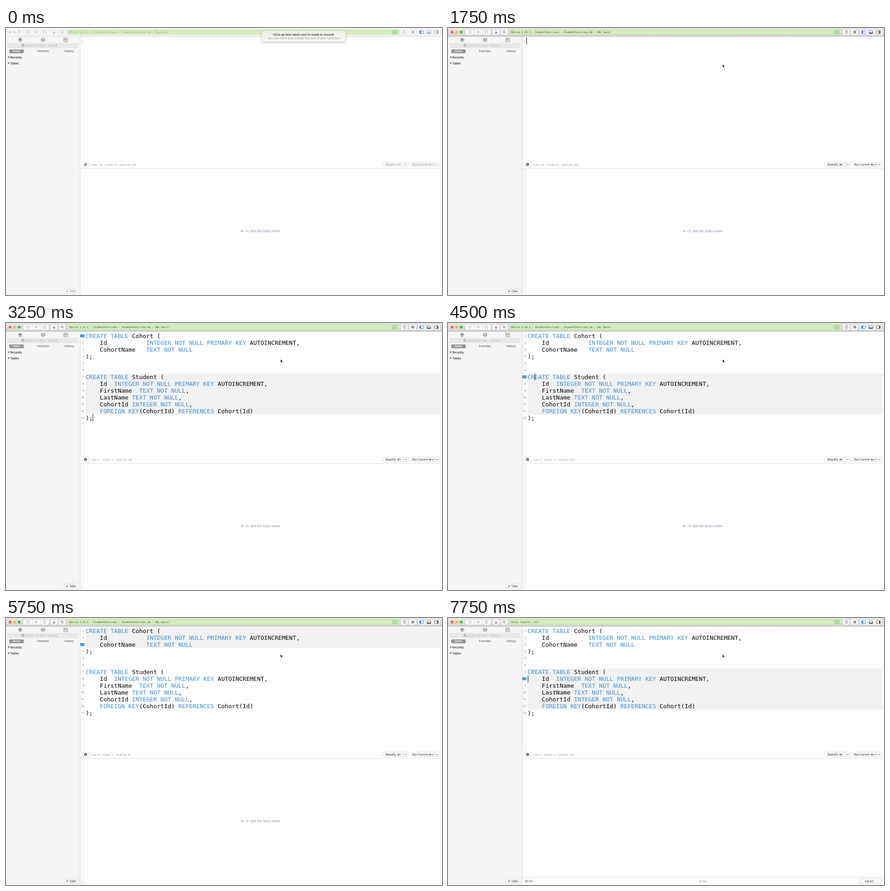
Write an HTML page with a canvas that moves like this. It is 956 px wide and 586 px high and loops after 8 s.

```html
<!DOCTYPE html>
<html lang="en">
<head>
<meta charset="utf-8">
<title>SQL editor</title>
<style>
html, body { margin: 0; width: 100%; height: 100%; overflow: hidden; background: #fdfdfd; }
canvas { display: block; }
</style>
</head>
<body>
<canvas id="stage" width="956" height="586"></canvas>
<script>
const ctx = document.getElementById('stage').getContext('2d');
const LOOP = 8000;
const UI = 'Inter, "DejaVu Sans", sans-serif';
const MONO = '"DejaVu Sans Mono", monospace';
const BLUE = '#4593d5';
const CODE_X = 174.5, CHAR_W = 7.826, LINE_H = 15;

const code = [
  'CREATE TABLE Cohort (',
  '    Id           INTEGER NOT NULL PRIMARY KEY AUTOINCREMENT,',
  '    CohortName   TEXT NOT NULL',
  ');',
  '',
  '',
  'CREATE TABLE Student (',
  '\tId  INTEGER NOT NULL PRIMARY KEY AUTOINCREMENT,',
  '\tFirstName  TEXT NOT NULL,',
  '\tLastName TEXT NOT NULL,',
  '\tCohortId INTEGER NOT NULL,',
  '\tFOREIGN KEY(CohortId) REFERENCES Cohort(Id)',
  ');'
];
const keywords = /\b(CREATE|TABLE|INTEGER|NOT|NULL|PRIMARY|KEY|TEXT|FOREIGN|REFERENCES)\b/;

// [time, caret line]
const moves = [[2000, 13], [3750, 12], [4250, 10], [4500, 7], [4750, 5], [5000, 4],
  [5250, 3], [6750, 4], [7000, 5], [7250, 6], [7500, 7], [7750, 8]];
const caretHidden = [[0, 750], [1250, 1750], [2750, 3250], [5750, 6000], [6500, 6750]];

const within = (t, from, to) => t >= from && t < to;

function rect(x, y, w, h, fill) {
  ctx.fillStyle = fill;
  ctx.fillRect(x, y, w, h);
}

function box(x, y, w, h, r, fill, stroke) {
  ctx.beginPath();
  ctx.roundRect(x, y, w, h, r);
  if (fill) { ctx.fillStyle = fill; ctx.fill(); }
  if (stroke) { ctx.strokeStyle = stroke; ctx.lineWidth = 0.6; ctx.stroke(); }
}

function text(str, x, y, size, color, { font = UI, weight = 400, align = 'left' } = {}) {
  ctx.font = `${weight} ${size}px ${font}`;
  ctx.textAlign = align;
  ctx.fillStyle = color;
  ctx.fillText(str, x, y);
}

function circle(x, y, r, fill, stroke) {
  ctx.beginPath();
  ctx.arc(x, y, r, 0, Math.PI * 2);
  if (fill) { ctx.fillStyle = fill; ctx.fill(); }
  if (stroke) { ctx.strokeStyle = stroke; ctx.stroke(); }
}

function path(d, stroke, width = 0.8, fill) {
  const p = new Path2D(d);
  ctx.lineWidth = width;
  if (fill) { ctx.fillStyle = fill; ctx.fill(p); }
  if (stroke) { ctx.strokeStyle = stroke; ctx.stroke(p); }
}

function magnifier(x, y, color) {
  path(`M${x + 1.2} ${y + 1.2}L${x + 3.2} ${y + 3.2}`, color, 0.9);
  circle(x - 0.5, y - 0.5, 2.3, null, color);
}

function button(x, y, w, h, active, dividers = []) {
  const edge = active ? '#c6c6c6' : '#dcdcdc';
  box(x, y, w, h, 2, active ? '#fbfbfb' : '#f7f7f7', edge);
  for (const d of dividers) rect(d, y, 0.7, h, edge);
}

function toolbarIcons(active) {
  const dim = active ? '#b4b4b4' : '#c4c4c4';
  const ink = active ? '#5a5a5a' : '#a4a4a4';
  ctx.lineWidth = 0.8;
  circle(48, 9, 3.3, null, dim);
  path('M46.7 7.7L49.3 10.3M49.3 7.7L46.7 10.3', dim);
  path('M62 9Q66 3.8 70 9Q66 14.2 62 9Z', dim);
  circle(66, 9, 1.3, dim);
  path('M80.5 6.5H88M80.5 9H84M85 9H88M80.5 11.5H88', dim, 1.2);
  path('M104 8.5V7.2Q105.5 4.6 107 7.2', active ? '#999' : dim);
  rect(103, 8.6, 5, 3.6, active ? '#999' : dim);
  magnifier(123.2, 8.8, ink);
  ctx.lineWidth = 0.9;
  ctx.beginPath();
  ctx.arc(874, 9.2, 2.8, -0.3, 4.6);
  ctx.strokeStyle = ink;
  ctx.stroke();
  path('M873.5 4.6L876 6.4L873.5 8Z', null, 0, ink);
  for (const x of [889.2, 892.4]) for (const y of [6.4, 9.6]) {
    ctx.strokeStyle = ink;
    ctx.lineWidth = 0.7;
    ctx.strokeRect(x, y, 2, 2);
  }
  const left = '#2f83f5';
  path('M907 6H915.5V12.2H907Z', left, 0.9);
  rect(907, 6, 3, 6.2, left);
  path('M923 6H931.5V12.2H923Z', ink, 0.9);
  rect(923, 9.8, 8.5, 2.4, ink);
  path('M939.5 6H948V12.2H939.5Z', ink, 0.9);
  rect(945, 6, 3, 6.2, ink);
}

function drawToolbar(t, active) {
  const g = ctx.createLinearGradient(0, 0, 0, 18);
  g.addColorStop(0, active ? '#e7e7e7' : '#f6f6f6');
  g.addColorStop(1, active ? '#d3d3d3' : '#f5f5f5');
  rect(0, 0, 956, 18, g);
  rect(0, 18, 956, 0.8, active ? '#bcbcbc' : '#d6d6d6');

  ['#fc5b57', '#fdbb2f', '#28c941'].forEach((color, i) =>
    circle(9 + i * 10, 9, 3, active ? color : '#dadada'));
  button(38, 3, 56, 12, active, [57, 75]);
  button(98, 3, 15, 12, active);
  button(115.5, 3, 15.5, 12, active);
  button(866, 3, 15, 12, active);
  button(884, 3, 15, 12, active);
  button(903, 3, 49, 12, active, [919, 936]);
  toolbarIcons(active);

  box(135, 3.3, 728, 11.5, 1.5, '#d3edbb', active ? '#bcd3a6' : '#cbe3b6');
  if (within(t, 6000, 6500)) rect(135, 14, 728, 1, '#8fc2a8');
  const title = t < 6000
    ? 'SQLite 3.23.1 : StudentExercises : StudentExercises.db : SQL Query'
    : 'Total results: 1/1';
  text(title, 138, 11, 5.5, active ? '#39452f' : '#96a888', { font: MONO });
  box(847, 6, 11, 6.4, 0.8, null, '#22b455');
  text('loc', 852.5, 10.8, 4.4, '#22b455', { align: 'center' });
}

function drawSidebar(active) {
  rect(0, 19, 162, 567, active ? '#f5f5f5' : '#f4f6f5');
  rect(162, 19, 0.9, 567, '#dadada');
  const ink = '#666';

  ctx.lineWidth = 0.8;
  circle(31, 26, 3.8, null, ink);
  path('M29.6 24H32.4V26.2L31 27.4L29.6 26.2ZM31 27V29.5', ink, 0.8, ink);
  ctx.beginPath();
  ctx.ellipse(81.3, 23.7, 3.6, 1.4, 0, 0, Math.PI * 2);
  ctx.stroke();
  path('M77.7 23.7V28.4Q81.3 31 84.9 28.4V23.7M77.7 26Q81.3 28.6 84.9 26', ink);
  path('M127 22.3H134.8V30H127Z', ink);
  text('SQL', 130.9, 27.4, 3.2, ink, { align: 'center', weight: 600 });

  box(4, 33.5, 154, 10, 2, '#e8e8e8', '#dfdfdf');
  magnifier(37.5, 38.3, '#707070');
  text('Search for item: ^name$...', 43.3, 40.7, 6, '#b9b9b9');

  box(7, 47, 32, 8.6, 2, '#969696');
  text('Items', 22.8, 53.4, 6, '#fff', { align: 'center', weight: 500 });
  text('Favorites', 81, 53.4, 6, '#4a4a4a', { align: 'center' });
  text('History', 138.5, 53.4, 6, '#4a4a4a', { align: 'center' });

  [['Recently', 67], ['Tables', 80]].forEach(([label, y]) => {
    path(`M3.6 ${y - 4.4}H8.2L5.9 ${y - 0.2}Z`, null, 0, '#707070');
    text(label, 9.6, y, 6, '#1c1c1c', { weight: 500 });
  });

  button(127.3, 572.8, 31, 9.8, active);
  const label = active ? '#333' : '#8c8c8c';
  path('M131.3 577.5H136.5M133.9 574.9V580.1', label, 0.7);
  text('Table', 138.6, 580, 6, label);
}

function drawControls(t, active, status) {
  const ink = active ? '#2c2c2c' : '#9b9b9b';
  button(167.3, 294, 14.6, 11, active);
  ctx.lineWidth = 1.5;
  circle(174.4, 299.4, 2, null, active ? '#444' : '#808080');
  for (let i = 0; i < 8; i++) {
    const a = i * Math.PI / 4, c = Math.cos(a), s = Math.sin(a);
    path(`M${174.4 + c * 2} ${299.4 + s * 2}L${174.4 + c * 3.6} ${299.4 + s * 3.6}`,
      active ? '#444' : '#808080', 1);
  }
  text(status, 186.2, 301.8, 5, '#85859f', { font: MONO });

  button(826, 294.3, 57, 10.4, active, [871]);
  text('Beautify ⌘I', 832.3, 301.7, 6, ink);
  button(887.3, 294.3, 64, 10.4, active, [939]);
  text('Run Current ⌘↩', 890.8, 301.7, 6, ink);
  for (const x of [876.8, 945]) path(`M${x - 2} 298.5L${x} 300.6L${x + 2} 298.5`, ink, 0.9);
  rect(163, 308, 793, 0.9, '#dedede');

  if (t < 6000) {
    text('⌘ + D: Split SQL Query screen.', 559, 448.4, 6, '#8484a6', { align: 'center' });
  } else {
    rect(163, 568.6, 793, 0.9, '#dcdcdc');
    text('30 ms', 168, 580, 6, '#333');
    text('0 row', 559, 580, 6, '#8a8a94', { align: 'center' });
    button(901.3, 572.2, 49.5, 10.2, active);
    text('Export...', 926, 579.6, 6, '#333', { align: 'center' });
  }
}

function drawCodeLine(line, y, colored) {
  let x = CODE_X;
  for (const part of line.replace('\t', '    ').split(keywords)) {
    text(part, x, y, 13, colored && keywords.test(part) ? BLUE : '#080808', { font: MONO });
    x += part.length * CHAR_W;
  }
}

function caretAt(t) {
  const line = moves.filter(([time]) => time <= t).pop()[1];
  const source = code[line - 1];
  const column = !source || source[0] === '\t' ? 1 : 3;
  const before = code.slice(0, line - 1).reduce((sum, s) => sum + s.length + 1, 0);
  return { line, column, location: before + column - 1 };
}

function drawEditor(t, active) {
  rect(163, 19, 793, 567, '#fdfdfd');
  if (active) {
    rect(163, 19, 9.5, 274, '#f9f9f9');
    if (t < 6000) rect(163, 309, 9.5, 277, '#f7f7f7');
  }
  const showCaret = !caretHidden.some(([a, b]) => within(t, a, b));

  if (t < 2000) {
    text('1', 166.8, 30.6, 5, '#858585', { font: MONO, align: 'center' });
    if (showCaret) rect(172, 21, 1, 15, '#111');
    return 'lines 18, column 12, position 365';
  }

  const { line, column, location } = caretAt(t);
  const marked = t < 3750 ? 1 : line;
  if (within(t, 5000, 7000)) rect(174.5, 21, 779, 45, '#f1f1f1');
  else rect(174.5, 111, 779, 90, '#f1f1f1');

  code.forEach((source, i) => {
    const top = 21 + i * LINE_H;
    const isMarked = i + 1 === marked;
    if (isMarked) rect(163, top + 4, 9.3, 6.5, BLUE);
    text(i + 1, 171, top + 9.4, 5, isMarked ? '#d8eafa' : '#777', { font: MONO, align: 'right' });
    drawCodeLine(source, top + 12, t >= 2250);
  });
  if (showCaret) {
    rect(Math.round(CODE_X + (column - 1) * CHAR_W), 21 + (line - 1) * LINE_H - (line > 12), 1, 15 + (line > 12), '#111');
  }
  return t < 3750
    ? 'line 1, column 3, location 318'
    : `line ${line}, column ${column}, location ${location}`;
}

function drawPopover() {
  ctx.save();
  ctx.shadowColor = 'rgba(0,0,0,.28)';
  ctx.shadowBlur = 4;
  ctx.shadowOffsetY = 1;
  const g = ctx.createLinearGradient(0, 5, 0, 31);
  g.addColorStop(0, '#eaf0e4');
  g.addColorStop(0.5, '#f0f2ee');
  g.addColorStop(1, '#f6f6f6');
  path('M647 6Q650 4.5 653 0.5Q656 4.5 659 6Z', null, 0, '#eaf0e4');
  box(561, 6, 183.5, 24.5, 3, g);
  ctx.restore();
  text("Click up here when you're ready to record!", 652.3, 16.6, 6.5, '#4c4e4b', { weight: 700, align: 'center' });
  text('You can move and change the size of your selection', 652.5, 25.2, 6.4, '#979997', { align: 'center' });
}

function drawPointer(x, y) {
  ctx.save();
  ctx.translate(x, y);
  path('M0 0V7.6L1.7 6L3 9L4.3 8.4L3.1 5.6H5.2Z', '#fff', 0.8, '#000');
  ctx.restore();
}

function draw(t) {
  const active = t >= 750;
  const status = drawEditor(t, active);
  drawSidebar(active);
  drawToolbar(t, active);
  drawControls(t, active, status);
  if (t < 250) drawPopover();
  else if (t < 500) drawPointer(645.5, 5.3);
  else drawPointer(602, 79.3);
}

const start = performance.now();
function tick() {
  draw((performance.now() - start) % LOOP);
  requestAnimationFrame(tick);
}
tick();
</script>
</body>
</html>
```
